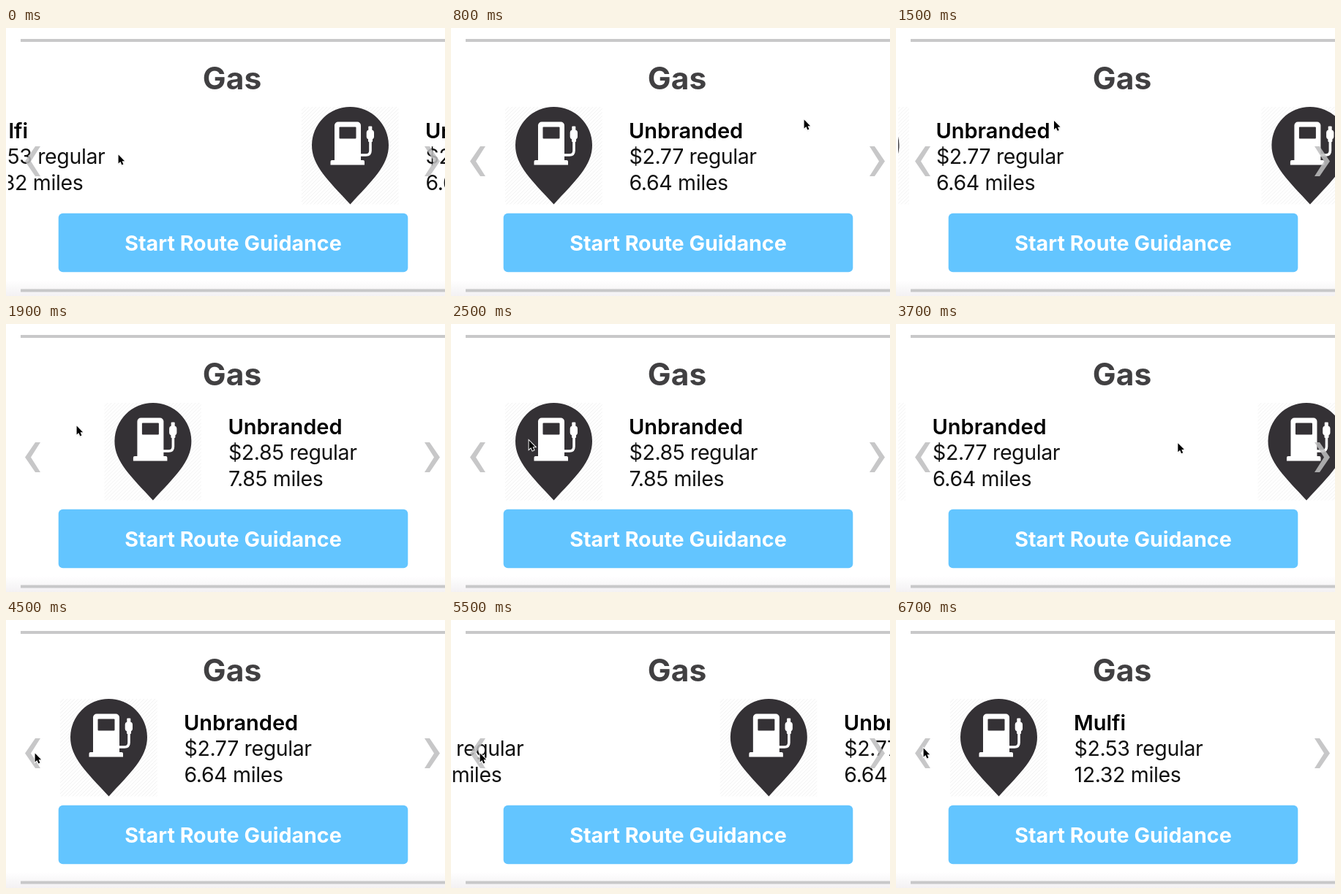
An HTML page with a canvas that plays this animation: 600x367 px, repeating every 7100 ms.

```html
<!DOCTYPE html>
<html lang="en">
<head>
<meta charset="utf-8">
<title>Gas stations</title>
<style>
  html, body { margin: 0; width: 100%; height: 100%; overflow: hidden; background: #fff; }
  canvas { display: block; }
</style>
</head>
<body>
<canvas id="stage" width="600" height="367"></canvas>
<script>
const ctx = document.getElementById('stage').getContext('2d');
const LOOP = 7100, STEP = 100, PITCH = 614, SETTLE = 400;
const DARK = '#343135', GREY = '#c8c8c9';

const slides = [
  ['Mulfi', '$2.53 regular', '12.32 miles'],
  ['Unbranded', '$2.77 regular', '6.64 miles'],
  ['Unbranded', '$2.85 regular', '7.85 miles']
];

// Pointer moves, each eased from where the last one ended
const home = { x: 153, y: 173 };
const moves = [
  { begin: 0, end: 100, x: 130, y: 172 },
  { begin: 150, end: 800, x: 482, y: 125 },
  { begin: 1000, end: 1800, x: 92, y: 127 },
  { begin: 1800, end: 2000, x: 100, y: 151 },
  { begin: 2400, end: 2600, x: 112, y: 167 },
  { begin: 2700, end: 3600, x: 397, y: 162 },
  { begin: 3600, end: 4500, x: 39, y: 182 },
  { begin: 5800, end: 6100, x: 75, y: 177 },
  { begin: 6200, end: 6700, x: 37, y: 175 }
];

// While held the track follows the pointer, then it settles on the next slide
const drags = [
  { begin: 0, release: 100, grab: 437, from: 0, to: 1 },
  { begin: 1100, release: 1700, grab: 404, from: 1, to: 2 },
  { begin: 2700, release: 3600, grab: 169, from: 2, to: 1 }
];
const CLICK = 5330;

const clamp = v => Math.max(0, Math.min(1, v));
const mix = (a, b, k) => a + (b - a) * k;
const easeOut = k => 1 - (1 - k) ** 2.4;
const easeInOut = k => k * k * (3 - 2 * k);

function pointerAt(t) {
  let { x, y } = home;
  for (const m of moves) {
    const k = easeInOut(clamp((t - m.begin) / (m.end - m.begin)));
    x = mix(x, m.x, k);
    y = mix(y, m.y, k);
  }
  return { x, y };
}

function trackAt(t) {
  if (t >= CLICK) return -PITCH * (1 - easeInOut(clamp((t - CLICK) / 350)));
  const { release, grab, from, to } = drags.filter(d => d.begin <= t).pop();
  const dir = from - to;
  const held = dir * Math.max(0, dir * (pointerAt(Math.min(t, release)).x - grab));
  const k = easeOut(clamp((t - release) / SETTLE));
  return mix(-PITCH * from + held, -PITCH * to, k);
}

function text(str, x, y, size, weight, color, spacing = 0, align = 'left') {
  ctx.font = `${weight} ${size}px Inter, "Open Sans", sans-serif`;
  ctx.letterSpacing = spacing + 'px';
  ctx.textAlign = align;
  ctx.fillStyle = color;
  ctx.fillText(str, x, y);
}

function rect(x, y, w, h, color, r = 0) {
  ctx.fillStyle = color;
  ctx.beginPath();
  ctx.roundRect(x, y, w, h, r);
  ctx.fill();
}

function poly(points, color) {
  ctx.fillStyle = color;
  ctx.beginPath();
  points.forEach(([x, y]) => ctx.lineTo(x, y));
  ctx.closePath();
  ctx.fill();
}

function clipped(x, y, w, h, paint) {
  ctx.save();
  ctx.beginPath();
  ctx.rect(x, y, w, h);
  ctx.clip();
  paint();
  ctx.restore();
}

function hatch() {
  ctx.strokeStyle = '#f1f1f1';
  ctx.lineWidth = 1;
  ctx.beginPath();
  for (let x = -60; x < 210; x += 5) {
    ctx.moveTo(x, 242);
    ctx.lineTo(x + 134, 108);
  }
  ctx.stroke();
}

function pump() {
  ctx.fillStyle = DARK;
  ctx.beginPath();
  ctx.arc(140.5, 160.5, 52.5, Math.PI, 0);
  ctx.bezierCurveTo(193, 189, 170, 209, 140.5, 241.5);
  ctx.bezierCurveTo(111, 209, 88, 189, 88, 160.5);
  ctx.fill();

  rect(119, 128.5, 36, 55, '#fff', [5, 5, 0, 0]);
  rect(113.5, 181, 46.5, 6.5, '#fff', [2, 2, 0, 0]);
  rect(125.5, 135.5, 23, 16, DARK, 1);

  ctx.strokeStyle = '#fff';
  ctx.lineWidth = 3.6;
  ctx.beginPath();
  ctx.moveTo(168, 150);
  ctx.lineTo(168, 168);
  ctx.quadraticCurveTo(168, 174, 162, 174);
  ctx.lineTo(154, 174);
  ctx.stroke();
  rect(165.3, 134.5, 5, 8, '#fff', 1);
  rect(162.7, 139.5, 10.3, 13, '#fff', 4);
  rect(165, 150, 6, 6, '#fff', 1);
}

function slide([name, price, distance], x) {
  if (x < -500 || x > 600) return;
  ctx.save();
  ctx.translate(x, 0);
  clipped(74, 108, 132.5, 133.5, hatch);
  pump();
  text(name, 243, 150.5, 29, 600, '#000');
  text(price, 243.5, 186, 28.5, 400, '#111', -0.38);
  text(distance, 243.5, 222, 28.5, 400, '#111', -0.35);
  ctx.restore();
}

function chevron(x, dir) {
  const shape = [[0, 182.5], [14, 162], [21, 162], [8, 182.5], [21, 203], [14, 203]];
  poly(shape.map(([dx, y]) => [x + dx * dir, y]), 'rgba(190,190,191,.86)');
}

function arrow({ x, y }) {
  const shape = [[0, 0], [0, 12.6], [2.9, 10], [5, 14.6], [7.2, 13.6], [5.2, 9.2], [9, 9]];
  ctx.save();
  ctx.translate(x + 0.6, y + 0.6);
  ctx.scale(0.95, 0.95);
  ctx.shadowColor = 'rgba(0,0,0,.3)';
  ctx.shadowBlur = 2;
  ctx.shadowOffsetY = 1;
  poly(shape, '#000');
  ctx.shadowColor = 'transparent';
  ctx.strokeStyle = '#fff';
  ctx.lineWidth = 2;
  ctx.stroke();
  poly(shape, '#000');
  ctx.restore();
}

function draw(t) {
  rect(0, 0, 600, 367, '#fff');
  const shade = ctx.createLinearGradient(0, 345, 0, 367);
  shade.addColorStop(0, '#fff');
  shade.addColorStop(1, '#f3f1f3');
  rect(0, 345, 600, 22, shade);
  rect(20, 15, 580, 4, GREY);
  rect(20, 357.5, 580, 4, GREY);
  text('Gas', 309, 84, 42.5, 700, '#414042', 0, 'center');

  const track = trackAt(t);
  clipped(3, 100, 597, 148, () => slides.forEach((s, i) => slide(s, track + i * PITCH)));

  chevron(26, 1);
  chevron(593, -1);
  rect(71.7, 253.8, 477.6, 80.4, '#63c5ff', 6);
  text('Start Route Guidance', 310.5, 305, 28.6, 700, '#fff', 0, 'center');
  arrow(pointerAt(t));
}

const start = performance.now();
function tick() {
  const t = (performance.now() - start) % LOOP;
  draw(Math.floor(t / STEP) * STEP);
  requestAnimationFrame(tick);
}
tick();
</script>
</body>
</html>
```
